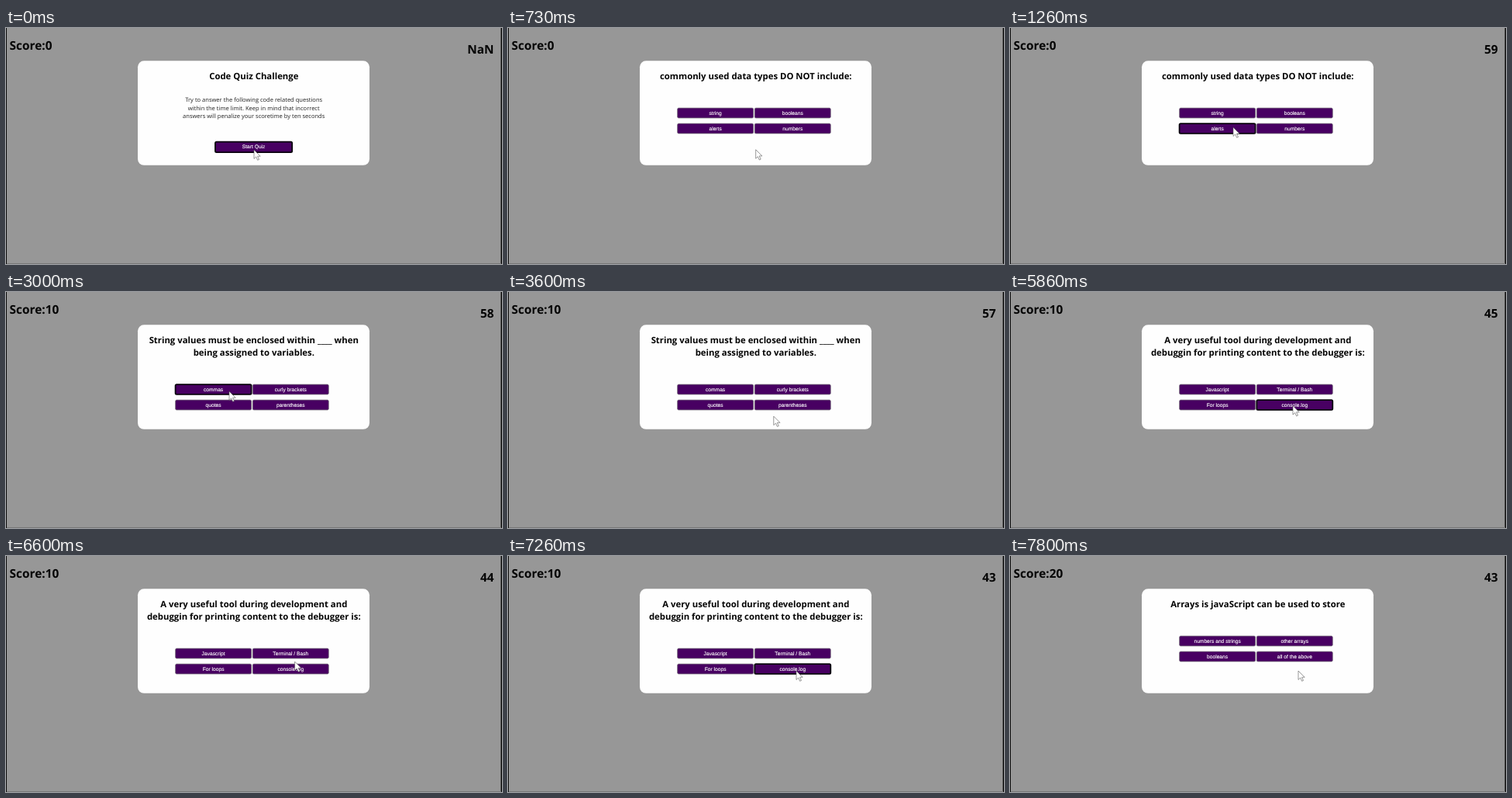
These frames come from a looping animation (640x304 px, 8 s). An HTML page:

```html
<!DOCTYPE html>
<html lang="en">
<head>
<meta charset="utf-8">
<title>Code Quiz</title>
<style>
  html, body { margin: 0; width: 100%; height: 100%; overflow: hidden; background: #979797; }
  svg { display: block; width: 640px; height: 304px; }
  text { font-family: "Open Sans", "Noto Sans", sans-serif; fill: #050505; text-rendering: geometricPrecision; }
  .big { font-size: 15.4px; font-weight: 700; }
  .title { font-size: 11.35px; font-weight: 700; text-anchor: middle; }
  .intro { font-size: 7.55px; fill: #222; text-anchor: middle; }
  .btn text { font: 6.67px "Liberation Sans", Arial, sans-serif; fill: #fff; stroke: #fff; stroke-width: .12px; text-anchor: middle; }
  .btn rect { fill: #480062; stroke: #77707b; stroke-width: .8px; }
  .btn.hover rect { stroke: #08000c; stroke-width: 1.8px; }
</style>
</head>
<body>
<svg id="stage" viewBox="0 0 640 304">
  <rect width="640" height="304" fill="#979797"/>
  <path d="M0 0h1v304h-1zM638.5 0h1.5v304h-1.5z" fill="#0c0c0c"/>
  <rect x="1" y="303" width="638" height="1" fill="#777"/>
  <rect x="170" y="42.3" width="299" height="134.5" rx="8" fill="#fefefe"/>
  <text id="score" class="big" x="4.6" y="27.6"></text>
  <text id="timer" class="big" x="629.6" y="32.6" text-anchor="end"></text>
</svg>
<script>
const LOOP = 8000;
const FPS = 15;
const stage = document.getElementById('stage');
const score = document.getElementById('score');
const timer = document.getElementById('timer');

// The countdown stands still from `answered` until the next screen opens.
const screens = [
  { opens: 0, score: 0,
    title: ['Code Quiz Challenge'],
    intro: ['Try to answer the following code related questions',
            'within the time limit. Keep in mind that incorrect',
            'answers will penalize your scoretime by ten seconds'] },
  { opens: 60, answered: 1260, score: 0, penalty: 0,
    title: ['commonly used data types DO NOT include:'],
    answers: ['string', 'booleans', 'alerts', 'numbers'] },
  { opens: 3000, answered: 4530, score: 10, penalty: 0,
    title: ['String values must be enclosed within ____ when', 'being assigned to variables.'],
    answers: ['commas', 'curly brackets', 'quotes', 'parentheses'] },
  { opens: 5260, answered: 7260, score: 10, penalty: 10,
    title: ['A very useful tool during development and', 'debuggin for printing content to the debugger is:'],
    answers: ['Javascript', 'Terminal / Bash', 'For loops', 'console.log'] },
  { opens: 7800, answered: LOOP, score: 20, penalty: 10,
    title: ['Arrays is javaScript can be used to store'],
    answers: ['numbers and strings', 'other arrays', 'booleans', 'all of the above'] }
];

// Eased pointer moves; `sag` bows the path downwards.
const home = { x: 320, y: 157 };
const moves = [
  { from: 700, to: 1260, x: 288, y: 128, sag: 0 },
  { from: 3000, to: 3930, x: 365, y: 146.6, sag: 24 },
  { from: 5860, to: 6330, x: 373, y: 128, sag: 0 },
  { from: 6500, to: 6730, x: 372, y: 148, sag: 0 }
];

function add(parent, tag, attrs, content = '') {
  const el = document.createElementNS('http://www.w3.org/2000/svg', tag);
  for (const key in attrs) el.setAttribute(key, attrs[key]);
  el.textContent = content;
  return parent.appendChild(el);
}

function addButton(parent, label, x, y, width, height) {
  const el = add(parent, 'g', { class: 'btn' });
  add(el, 'rect', { x, y, width, height, rx: 1.6 });
  add(el, 'text', { x: x + width / 2, y: y + height / 2 + 2.1 }, label);
  const contains = (px, py) => px >= x && px <= x + width && py >= y && py <= y + height;
  return { el, contains };
}

function build({ title, intro = [], answers }) {
  const group = add(stage, 'g', {});
  title.forEach((line, i) => add(group, 'text', { class: 'title', x: 319.8, y: 65.5 + 16 * i }, line));
  intro.forEach((line, i) => add(group, 'text', { class: 'intro', x: 319.7, y: 95 + 10.6 * i }, line));
  const top = 87.1 + 16 * title.length;
  const buttons = answers
    ? answers.map((label, i) =>
        addButton(group, label, 218.6 + 99.7 * (i % 2), top + 20 * (i >> 1), 98, 12.8))
    : [addButton(group, 'Start Quiz', 270, 146.6, 99.2, 13.5)];
  return { group, buttons };
}

const views = screens.map(build);
const cursor = add(stage, 'path', {
  d: 'M0 0V11.4L2.7 8.9L4.6 13.2L6.5 12.4L4.6 8.2H8.2Z',
  fill: '#fff', stroke: '#555', 'stroke-width': .6, 'stroke-linejoin': 'round'
});

function pointerAt(t) {
  let { x, y } = home;
  for (const move of moves) {
    const p = Math.min(1, Math.max(0, (t - move.from) / (move.to - move.from)));
    const eased = p * p * (3 - 2 * p);
    x += (move.x - x) * eased;
    y += (move.y - y) * eased + move.sag * Math.sin(Math.PI * eased);
  }
  return { x, y };
}

function secondsLeft({ answered, penalty }, t) {
  const elapsed = Math.floor((Math.min(t, answered) - 130) / 1000);
  return elapsed < 1 ? '' : 60 - elapsed - penalty;
}

function draw(t) {
  const current = screens.findLastIndex(({ opens }) => opens <= t);
  const screen = screens[current];
  const { x, y } = pointerAt(t);
  views.forEach(({ group }, i) => group.setAttribute('display', i === current ? 'inline' : 'none'));
  for (const { el, contains } of views[current].buttons) el.classList.toggle('hover', contains(x, y));
  score.textContent = 'Score:' + screen.score;
  timer.textContent = secondsLeft(screen, t);
  cursor.setAttribute('transform', `translate(${x} ${y})`);
}

const start = performance.now();
function tick() {
  const t = (performance.now() - start) % LOOP;
  // Hold each pose for one recorded frame; times are cut to whole centiseconds.
  draw(Math.floor((t + 7) * FPS / 1000) * 1000 / FPS);
  requestAnimationFrame(tick);
}
tick();
</script>
</body>
</html>
```
